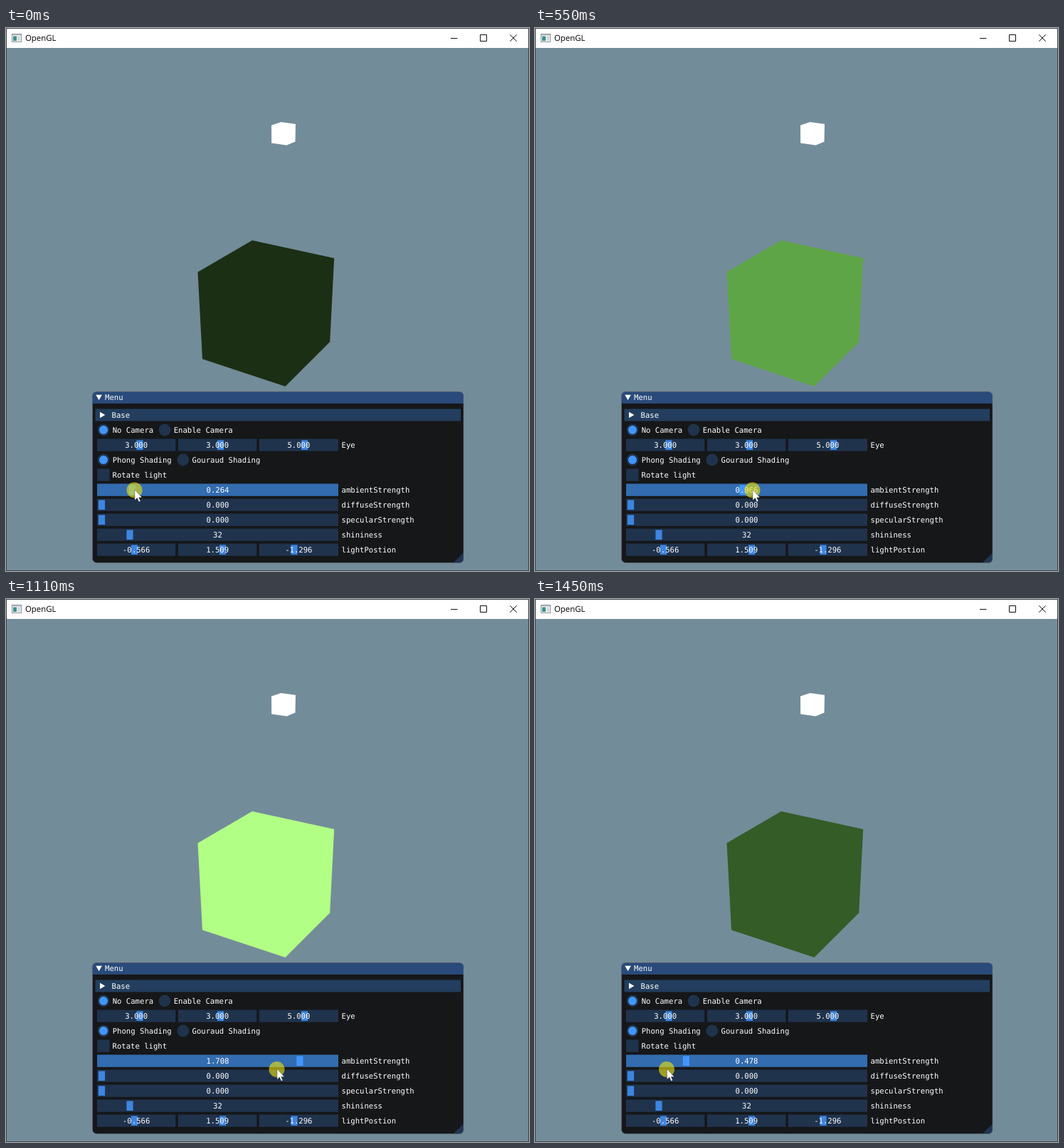
Recreate the animation shown at these times as an HTML page. Size 735 by 762 pixels, loop 1520 ms.

```html
<!DOCTYPE html>
<html lang="en">
<head>
<meta charset="utf-8">
<title>OpenGL</title>
<style>
  html, body { margin: 0; width: 100%; height: 100%; overflow: hidden; background: #738c99; }
  svg { display: block; width: 735px; height: 762px; }
  text { font: 10.62px "DejaVu Sans Mono", monospace; fill: #fff; white-space: pre; text-rendering: geometricPrecision; }
  .caption { font: 11.4px "Open Sans", sans-serif; fill: #000; }
  .mid { text-anchor: middle; }
  .field { fill: #20334d; }
  .grab { fill: #3d85e0; }
  .on { fill: #4296fa; }
</style>
</head>
<body>
<svg viewBox="0 0 735 762">
  <rect width="735" height="762" fill="#738c99"/>
  <rect width="735" height="28" fill="#fff"/>

  <g>
    <rect x="8.5" y="8.5" width="13" height="11" fill="#f4f6f7" stroke="#8b9299"/>
    <path d="M9 9.7H21" stroke="#b4bcc4" stroke-width="1.4"/>
    <rect x="10" y="11.5" width="5" height="6.5" fill="#3f8f8c"/>
    <rect x="16" y="11.5" width="4" height="6.5" fill="#d5dade"/>
  </g>
  <text class="caption" x="27" y="18.3">OpenGL</text>
  <path d="M625 14.5H634.5M666.5 9.5H675.5V18.5H666.5ZM708.3 9.3L717.7 18.7M717.7 9.3L708.3 18.7" fill="none" stroke="#111"/>

  <path d="M373 136.5L386.5 132L407 134.8L406.5 159.5L394.5 164.5L373.2 161.5Z" fill="#fff"/>
  <path id="cube" d="M346 298L461.2 323L455.2 440.5L392.5 503L276 464.5L269.5 342.5Z"/>

  <rect x="121.5" y="510.5" width="521.5" height="240" rx="6" fill="#151718"/>
  <path d="M121.5 527V516.5Q121.5 510.5 127.5 510.5H637Q643 510.5 643 516.5V527Z" fill="#294a7a"/>
  <path d="M643 736.5V744.5Q643 750.5 637 750.5H628.5Z" fill="#1f3552"/>
  <rect x="121.5" y="510.5" width="521.5" height="240" rx="6" fill="none" stroke="#6e6e80" stroke-opacity=".5"/>
  <path d="M126.3 514.8H134.9L130.6 522.2Z" fill="#fff"/>
  <rect x="125.5" y="534.5" width="513.5" height="17" fill="#233e5e"/>
  <path d="M132 538.7V547.3L139.4 543Z" fill="#fff"/>

  <g id="ui"></g>

  <g id="pointer">
    <circle r="11" fill="#ebe10f" fill-opacity=".62"/>
    <path d="M.5-.5V14.3L3.9 11.1L6.3 16.4L8.5 15.4L6.2 10.4H10.6Z" fill="#fff" stroke="#000" stroke-opacity=".6" stroke-width=".5"/>
  </g>
  <path d="M.5 0V762M734.5 0V762M0 .5H735M0 761.5H735" stroke="#3d454b"/>
</svg>
<script>
const ui = document.getElementById('ui');
const cube = document.getElementById('cube');
const pointer = document.getElementById('pointer');

function add(tag, attrs, content = '') {
  const el = document.createElementNS('http://www.w3.org/2000/svg', tag);
  for (const k in attrs) el.setAttribute(k, attrs[k]);
  el.textContent = content;
  return ui.appendChild(el);
}

const label = (x, y, s, cls = '') => add('text', { x, y: y + 4, class: cls }, s);

function radio(x, y, s, on) {
  add('circle', { cx: x, cy: y, r: 8.4, class: 'field' });
  if (on) add('circle', { cx: x, cy: y, r: 6, class: 'on' });
  label(x + 12.7, y, s);
}

function slider(x, y, w, grabX, value) {
  const bar = add('rect', { x, y: y - 8.5, width: w, height: 17.3, class: 'field' });
  const grab = add('rect', { x: grabX - 4.6, y: y - 6.6, width: 9.2, height: 13.6, class: 'grab' });
  const text = label(x + w / 2, y, value, 'mid');
  return { bar, grab, text };
}

function triple(y, grabs, values, name) {
  [128, 242, 355.7].forEach((x, i) => slider(x, y, i < 2 ? 110.3 : 111.3, grabs[i], values[i]));
  label(471.5, y, name);
}

label(139, 518.3, 'Menu');
label(148.5, 543, 'Base');
radio(137, 564, 'No Camera', true);
radio(223, 564, 'Enable Camera');
triple(585, [188, 301.5, 419.5], ['3.000', '3.000', '5.000'], 'Eye');
radio(137, 606, 'Phong Shading', true);
radio(248.8, 606, 'Gouraud Shading');
add('rect', { x: 128.2, y: 618.5, width: 17.3, height: 17.3, class: 'field' });
label(149.5, 627, 'Rotate light');

const ZERO = 134.5, UNIT = 163;
const ambient = slider(128, 648, 339, ZERO, '');
ambient.bar.style.fill = '#336caf';
ambient.grab.style.fill = '#4296fa';
label(471.5, 648, 'ambientStrength');
[['diffuseStrength', ZERO, '0.000'], ['specularStrength', ZERO, '0.000'], ['shininess'.replace('ness', 'ness'), 174, '32']]
  .forEach(([name, grabX, value], i) => {
    const y = 669 + 21 * i;
    slider(128, y, 339, grabX, value);
    label(471.5, y, name === 'shininess' ? 'shininess' : name);
  });
triple(732, [180.5, 304.5, 405], ['-0.566', '1.509', '-1.296'], 'lightPostion');

// [time, pointer x]
const steps = [
  [0, 180.5], [50, 189], [100, 200], [150, 212.5], [210, 223.335], [260, 229.3],
  [310, 238], [360, 251], [410, 265], [460, 279], [510, 291.958], [550, 305.5],
  [590, 322], [640, 354], [700, 386], [750, 408], [800, 415.675], [860, 421],
  [910, 424], [960, 425], [1060, 412.904], [1110, 380.5], [1160, 352], [1210, 324],
  [1260, 299.293], [1320, 258.3], [1370, 224], [1410, 212.414], [1450, 185]
];
const LOOP = 1520, REST = 177.532;
const strength = i => ((i < 0 ? REST : steps[i][1]) - ZERO) / UNIT;

let shown = -1;
function draw(time) {
  const i = steps.findLastIndex(s => s[0] <= time);
  if (i === shown) return;
  shown = i;
  const [t, x] = steps[i];
  const y = 648.5 + 11.5 * Math.min(1, Math.max(0, (t - 600) / 330));
  pointer.setAttribute('transform', `translate(${x} ${y})`);

  // The slider trails the pointer by one step, the cube by about half a step more.
  const value = strength(i - 1);
  const lit = (value + strength(i - 2)) / 2;
  ambient.grab.setAttribute('x', ZERO + UNIT * value - 4.6);
  ambient.text.textContent = value.toFixed(3);
  const rgb = [0.4, 0.7, 0.3].map(c => Math.round(Math.min(255, 255 * c * lit)));
  cube.setAttribute('fill', `rgb(${rgb})`);
}

const start = performance.now();
function tick() {
  draw((performance.now() - start) % LOOP);
  requestAnimationFrame(tick);
}
tick();
</script>
</body>
</html>
```
